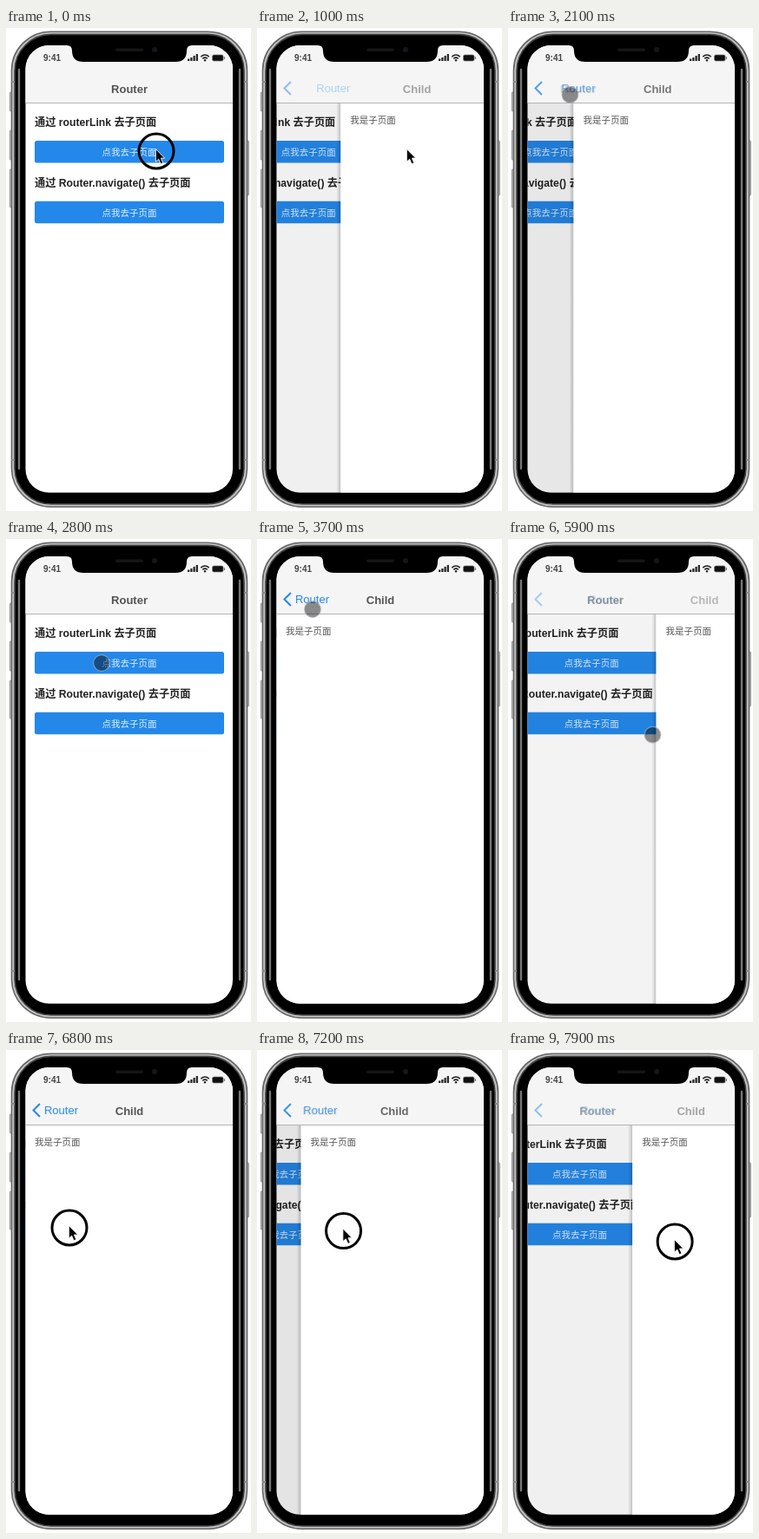
These frames come from a looping animation (282 px wide and 557 px high, 8 s). An HTML page:

```html
<!DOCTYPE html>
<html lang="zh">
<head>
<meta charset="utf-8">
<title>Page navigation</title>
<style>
html, body { margin: 0; width: 100%; height: 100%; overflow: hidden; background: #fff; }
svg { display: block; width: 282px; height: 557px; }
text { font-family: "Liberation Sans", "Noto Sans CJK SC", "Noto Sans CJK", sans-serif; }
.title { font-size: 13px; font-weight: bold; fill: #545456; text-anchor: middle; }
.back { font-size: 13px; fill: #2488ea; text-anchor: middle; }
.heading { font-size: 12.2px; font-weight: bold; fill: #222; }
.button { font-size: 10.5px; fill: #e0efff; text-anchor: middle; }
.body { font-size: 10.5px; fill: #555; }
.clock { font-size: 10px; font-weight: bold; fill: #444; }
</style>
</head>
<body>
<svg viewBox="0 0 282 557">
  <defs>
    <clipPath id="screen"><rect x="22.5" y="20" width="238.5" height="515.8" rx="27"/></clipPath>
    <linearGradient id="edge">
      <stop offset="0" stop-color="#000" stop-opacity="0"/>
      <stop offset="1" stop-color="#000" stop-opacity=".2"/>
    </linearGradient>
  </defs>

  <!-- phone body -->
  <g fill="#bbb" stroke="#777" stroke-width=".7">
    <rect x="4.4" y="74" width="3" height="22" rx="1"/>
    <rect x="4.4" y="118" width="3" height="34" rx="1"/>
    <rect x="4.4" y="163" width="3" height="44" rx="1"/>
    <rect x="276.4" y="130" width="3" height="63" rx="1"/>
  </g>
  <rect x="6.5" y="4.2" width="271" height="548" rx="45" fill="#c4c4c4" stroke="#666" stroke-width="1.6"/>
  <rect x="10" y="7.4" width="264" height="541.6" rx="42" fill="#000" stroke="#444" stroke-width="1.6"/>
  <path d="M15 48V508M269 48V508" stroke="#777" stroke-width="2.4" stroke-linecap="round"/>
  <path d="M6 62h4M274 62h4M6 498h4M274 498h4" stroke="#888" stroke-width="2"/>

  <g clip-path="url(#screen)">
    <rect x="22" y="20" width="241" height="518" fill="#fff"/>
    <g id="home">
      <text class="heading" x="33" y="113">通过 routerLink 去子页面</text>
      <rect x="33" y="130" width="218" height="25.5" rx="2.5" fill="#2488ea"/>
      <text class="button" x="142" y="147">点我去子页面</text>
      <text class="heading" x="33" y="183">通过 Router.navigate() 去子页面</text>
      <rect x="33" y="199.7" width="218" height="25.5" rx="2.5" fill="#2488ea"/>
      <text class="button" x="142" y="216.5">点我去子页面</text>
    </g>
    <rect id="shade" x="22" y="86" width="241" height="452"/>
    <g id="child">
      <rect x="17" y="86" width="5" height="452" fill="url(#edge)"/>
      <rect x="22" y="86" width="242" height="452" fill="#fff"/>
      <text class="body" x="33" y="109.5">我是子页面</text>
    </g>

    <rect x="22" y="20" width="241" height="66" fill="#f5f5f5"/>
    <path d="M22 86.5H263" stroke="#b4b4b4"/>
    <path id="chevron" d="M39 62l-7.5 7.5 7.5 7.5" fill="none" stroke="#2488ea" stroke-width="2"/>
    <text id="homeTitle" class="title" y="75">Router</text>
    <text id="backLabel" class="back" y="74">Router</text>
    <text id="childTitle" class="title" y="75">Child</text>

    <!-- status bar -->
    <text class="clock" x="43" y="38">9:41</text>
    <path d="M210.2 38v-2.5M213.4 38v-4M216.6 38v-6M219.8 38v-8" stroke="#222" stroke-width="2.2"/>
    <g fill="none" stroke="#222" stroke-width="1.6">
      <path d="M224.3 33.2q4.7-4.4 9.4 0M226.3 35.4q2.7-2.4 5.4 0"/>
    </g>
    <circle cx="229" cy="37.2" r="1.2" fill="#222"/>
    <rect x="237.5" y="31" width="12.5" height="7" rx="1.8" fill="#111" stroke="#777" stroke-width=".7"/>
    <rect x="250.8" y="33" width="1.2" height="3" rx=".6" fill="#777"/>
  </g>

  <!-- notch -->
  <path d="M70 18H214V20Q208 20 208 26Q208 39 195 39H89Q76 39 76 26Q76 20 70 20Z"/>
  <rect x="126" y="23.5" width="32" height="3.5" rx="1.75" fill="#151515"/>
  <circle cx="171" cy="25" r="3" fill="#14161c"/>

  <circle id="touch" r="9.3" fill="#000" fill-opacity=".44" stroke="#a0abb6" stroke-opacity=".7" stroke-width="1.2"/>
  <g id="mouse">
    <circle id="ring" r="20" fill="none" stroke="#000" stroke-width="3"/>
    <path d="M-.7-2.5V12.2L2.7 9.2 5.1 14.8 7.8 13.6 5.4 8.1H9.7Z" stroke="#fff" stroke-width=".9"/>
  </g>
</svg>

<script>
const LOOP = 8000, WIDTH = 240, SLIDE = 400, SNAP = 150;
const el = id => document.getElementById(id);
const clamp = v => Math.max(0, Math.min(1, v));
const set = (id, attrs) => {
  for (const key in attrs) el(id).setAttribute(key, attrs[key]);
};

// Pointer path: time, x, y
const path = [
  [0, 173, 142], [1300, 173, 142], [1700, 150, 24], [1850, 120, 24], [1900, 110, 31],
  [1980, 18, 76], [2000, 18, 76], [2100, 71, 77], [2480, 225, 82], [2560, 225, 82],
  [2800, 110, 143], [3050, 110, 143], [3500, 64, 81], [3850, 64, 81], [4350, 82, 211],
  [5200, 82, 211], [5550, 18, 215], [5650, 18, 215], [6000, 225, 230], [6230, 140, 535],
  [6300, 150, 32], [6400, 73, 205], [7000, 73, 205], [7900, 192, 221], [8000, 205, 223]
];

// Page changes; a drag follows the pointer until it is released
const actions = [
  { at: 800, kind: 'push' },
  { at: 2000, kind: 'drag', from: 18, until: 2480 },
  { at: 2900, kind: 'push' },
  { at: 3750, kind: 'pop' },
  { at: 4800, kind: 'push' },
  { at: 5650, kind: 'drag', from: 18, until: 6000 },
  { at: 6400, kind: 'push' },
  { at: 7000, kind: 'drag', from: 71, until: LOOP }
];

function pointer(t) {
  const i = Math.max(1, path.findIndex(key => key[0] >= t));
  const [t0, x0, y0] = path[i - 1], [t1, x1, y1] = path[i];
  const k = clamp((t - t0) / (t1 - t0));
  return { x: x0 + (x1 - x0) * k, y: y0 + (y1 - y0) * k };
}

// shown: how far the child page covers the home page
// fade: header cross-fade; title: opacity of the home title
function pages(t) {
  const action = actions.filter(a => a.at <= t).pop();
  if (!action) return { shown: 0, fade: 0, title: 1 };
  if (action.kind === 'drag') {
    const held = pointer(Math.min(t, action.until)).x - action.from;
    const shown = clamp(1 - held / WIDTH) * (1 - clamp((t - action.until) / SNAP));
    return { shown, fade: shown, title: 1 - shown };
  }
  const k = clamp((t - action.at) / SLIDE);
  const rest = Math.pow(1 - k, 1.68);
  const fade = action.kind === 'push' ? k : 1 - k;
  return { shown: action.kind === 'push' ? 1 - rest : rest, fade, title: clamp(1 - 2 * fade) };
}

function draw(t) {
  const { shown, fade, title } = pages(t);
  const { x, y } = pointer(t);
  const place = `translate(${x} ${y})`;
  const titleX = 142 - 78.5 * shown;
  const isTouch = t >= 1900 && t < 6270;
  const pressed = t < 850 || t >= 6390;

  set('home', { transform: `translate(${-WIDTH / 2 * shown} 0)` });
  set('shade', { opacity: 0.12 * fade });
  set('child', {
    transform: `translate(${WIDTH * (1 - shown)} 0)`,
    visibility: shown > 0 ? 'visible' : 'hidden'
  });
  set('chevron', { opacity: fade });
  set('homeTitle', { x: titleX, opacity: title });
  set('backLabel', { x: titleX, opacity: Math.pow(fade, 1.6) });
  set('childTitle', { x: 142 + 136 * (1 - shown), opacity: fade });
  set('touch', { transform: place, visibility: isTouch ? 'visible' : 'hidden' });
  set('mouse', { transform: place, display: isTouch || (t > 1800 && t < 1900) ? 'none' : 'inline' });
  set('ring', { visibility: pressed ? 'visible' : 'hidden' });
}

const start = performance.now();
function tick() {
  draw((performance.now() - start) % LOOP);
  requestAnimationFrame(tick);
}
tick();
</script>
</body>
</html>
```
